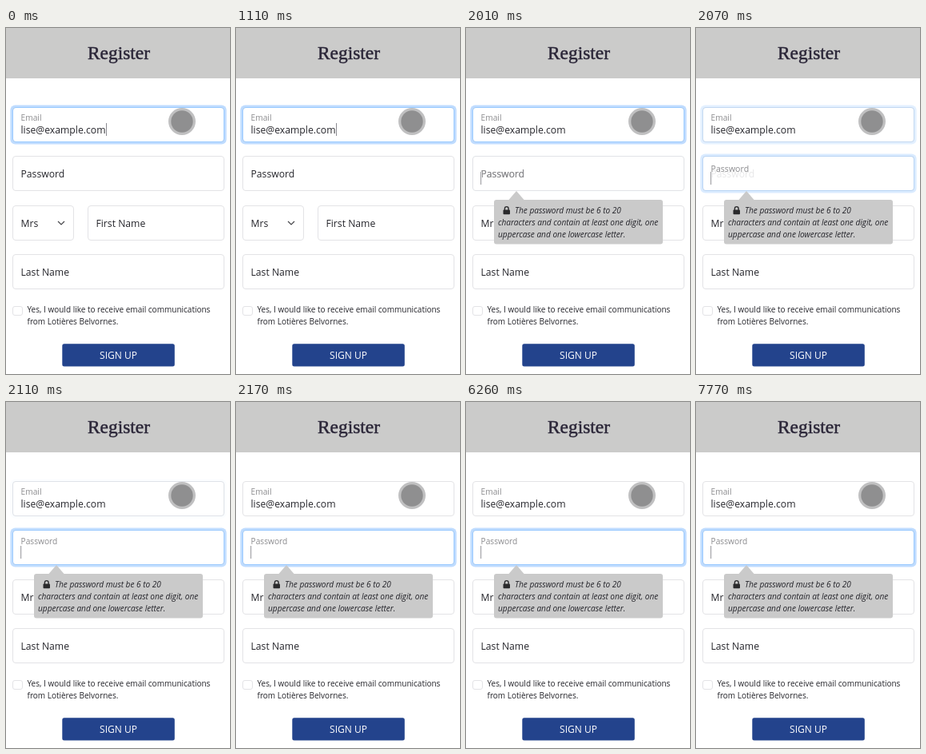
These frames come from a looping animation (280x433 px, 8 s). An HTML page with a canvas:

```html
<!DOCTYPE html>
<html lang="en">
<head>
<meta charset="utf-8">
<title>Register</title>
<style>
html, body { margin: 0; width: 100%; height: 100%; overflow: hidden; background: #fff; }
canvas { display: block; width: 280px; height: 433px; }
</style>
</head>
<body>
<canvas id="stage"></canvas>
<script>
const W = 280, H = 433, LOOP = 8000;
const SANS = '"Open Sans", "Noto Sans", sans-serif';
const INK = '#25252b', MUTED = '#8b8b8e', LINE = '#e3e3e6';
const EMAIL = 'lise@example.com';
const TEXT = 12.2, LABEL = 10.2, SMALL = 10;
const FOCUS_AT = 2000;
// Times at which the text cursor toggles.
const EMAIL_BLINKS = [440, 1110, 1930];
const PASSWORD_BLINKS = [2570, 3240, 4080, 4990, 5680, 6260, 7020, 7770];

const canvas = document.getElementById('stage');
const ctx = canvas.getContext('2d');
const dpr = window.devicePixelRatio || 1;
canvas.width = W * dpr;
canvas.height = H * dpr;
ctx.scale(dpr, dpr);

const lerp = (a, b, p) => a + (b - a) * p;

function progress(t, start, length) {
  const u = Math.min(1, Math.max(0, (t - start) / length));
  return u * u * (3 - 2 * u);
}

const caretOn = (t, blinks) => blinks.filter(b => t >= b).length % 2 === 0;

function text(str, x, y, size, color = INK, style = '', family = SANS) {
  ctx.font = `${style} ${size}px ${family}`;
  ctx.fillStyle = color;
  ctx.fillText(str, x, y);
}

function box(x, y, w, h, r) {
  ctx.beginPath();
  ctx.roundRect(x, y, w, h, r);
}

function disc(x, y, r, color) {
  ctx.fillStyle = color;
  ctx.beginPath();
  ctx.arc(x, y, r, 0, Math.PI * 2);
  ctx.fill();
}

function field(x, y, w, h = 44, glow = 0, r = 3.5) {
  if (glow > 0) {
    ctx.globalAlpha = glow;
    ctx.fillStyle = '#bfdcff';
    box(x - 2.6, y - 2.6, w + 5.2, h + 5.2, r + 2.6);
    ctx.fill();
    ctx.globalAlpha = 1;
  }
  box(x + 0.5, y + 0.5, w - 1, h - 1, r);
  ctx.fillStyle = '#fff';
  ctx.fill();
  ctx.lineWidth = 1;
  ctx.strokeStyle = LINE;
  ctx.stroke();
  if (glow > 0) {
    ctx.globalAlpha = glow;
    ctx.strokeStyle = '#98c9ff';
    ctx.stroke();
    ctx.globalAlpha = 1;
  }
}

function caret(x, y, color) {
  ctx.fillStyle = color;
  ctx.fillRect(x, y, 1, 16);
}

function title() {
  const color = '#2b2638';
  text('Register', 102, 38.5, 23.4, color, '', '"Liberation Serif", serif');
  ctx.strokeStyle = color;
  ctx.lineWidth = 0.5;
  ctx.strokeText('Register', 102, 38.5);
}

function emailField(t, glow) {
  field(8, 99, 265, 44, glow);
  text('Email', 18.5, 116, LABEL, MUTED);
  text(EMAIL, 18.5, 132, TEXT);
  if (t < FOCUS_AT && caretOn(t, EMAIL_BLINKS)) {
    caret(Math.round(19 + ctx.measureText(EMAIL).width), 119, '#8a8a90');
  }
}

function passwordField(t, glow) {
  field(8, 160, 265, 44, glow);
  if (t < FOCUS_AT) {
    text('Password', 18.5, 187, TEXT);
    return;
  }
  const p = progress(t, FOCUS_AT, 100);
  ctx.globalAlpha = 1 - p;
  text('Password', 18.5, 187, TEXT, MUTED);
  ctx.globalAlpha = 1;
  text('Password', 18.5, lerp(187, 178, p), lerp(TEXT, LABEL, p), MUTED);
  caret(19, 180, '#ececee');
  if (caretOn(t, PASSWORD_BLINKS)) caret(18, 180, '#a6a6a9');
}

function nameFields() {
  field(8, 222, 77);
  text('Mrs', 18.5, 249, TEXT);
  ctx.strokeStyle = '#45454a';
  ctx.lineWidth = 1.2;
  ctx.beginPath();
  ctx.moveTo(65, 242);
  ctx.lineTo(69, 246);
  ctx.lineTo(73, 242);
  ctx.stroke();
  field(102, 222, 171);
  text('First Name', 112.5, 249, TEXT);
  field(8, 283, 265);
  text('Last Name', 18.5, 310, TEXT);
}

function lock(x, y) {
  ctx.fillStyle = ctx.strokeStyle = '#2a2a2c';
  box(x, y + 4.5, 8.5, 5.8, 1);
  ctx.fill();
  ctx.lineWidth = 1.4;
  ctx.beginPath();
  ctx.moveTo(x + 1.9, y + 5);
  ctx.arc(x + 4.25, y + 3, 2.35, Math.PI, 0);
  ctx.lineTo(x + 6.6, y + 5);
  ctx.stroke();
}

function tooltip() {
  const line = (str, x, y) => text(str, x, y, 10.1, INK, 'italic');
  ctx.fillStyle = '#cacaca';
  box(35, 215, 211, 55.5, 3);
  ctx.fill();
  ctx.beginPath();
  ctx.moveTo(53, 215.5);
  ctx.lineTo(63, 204);
  ctx.lineTo(73, 215.5);
  ctx.fill();
  lock(46.5, 223);
  line('The password must be 6 to 20', 61, 232);
  line('characters and contain at least one digit, one', 40, 247);
  line('uppercase and one lowercase letter.', 40, 262);
}

function footer() {
  field(8, 348, 13, 12, 0, 2.5);
  text('Yes, I would like to receive email communications', 26.5, 356, SMALL);
  text('from Lotières Belvornes.', 26.5, 371, SMALL);
  ctx.fillStyle = '#23438c';
  box(70.3, 395.2, 140.5, 28.2, 2.5);
  ctx.fill();
  ctx.textAlign = 'center';
  text('SIGN UP', 140.5, 413.5, 12, '#fff', '500');
  ctx.textAlign = 'left';
}

function draw(t) {
  const shift = progress(t, FOCUS_AT, 130);
  ctx.fillStyle = '#fff';
  ctx.fillRect(0, 0, W, H);
  ctx.fillStyle = '#cbcbca';
  ctx.fillRect(0, 0, W, 63);

  title();
  emailField(t, 1 - shift);
  passwordField(t, shift);
  nameFields();
  footer();
  if (t >= 1950) tooltip();

  disc(220, 117, 17, '#c0c0c1');
  disc(220, 117, 13.7, '#8f8f90');
}

const start = performance.now();
function tick() {
  draw((performance.now() - start) % LOOP);
  requestAnimationFrame(tick);
}
tick();
</script>
</body>
</html>
```
